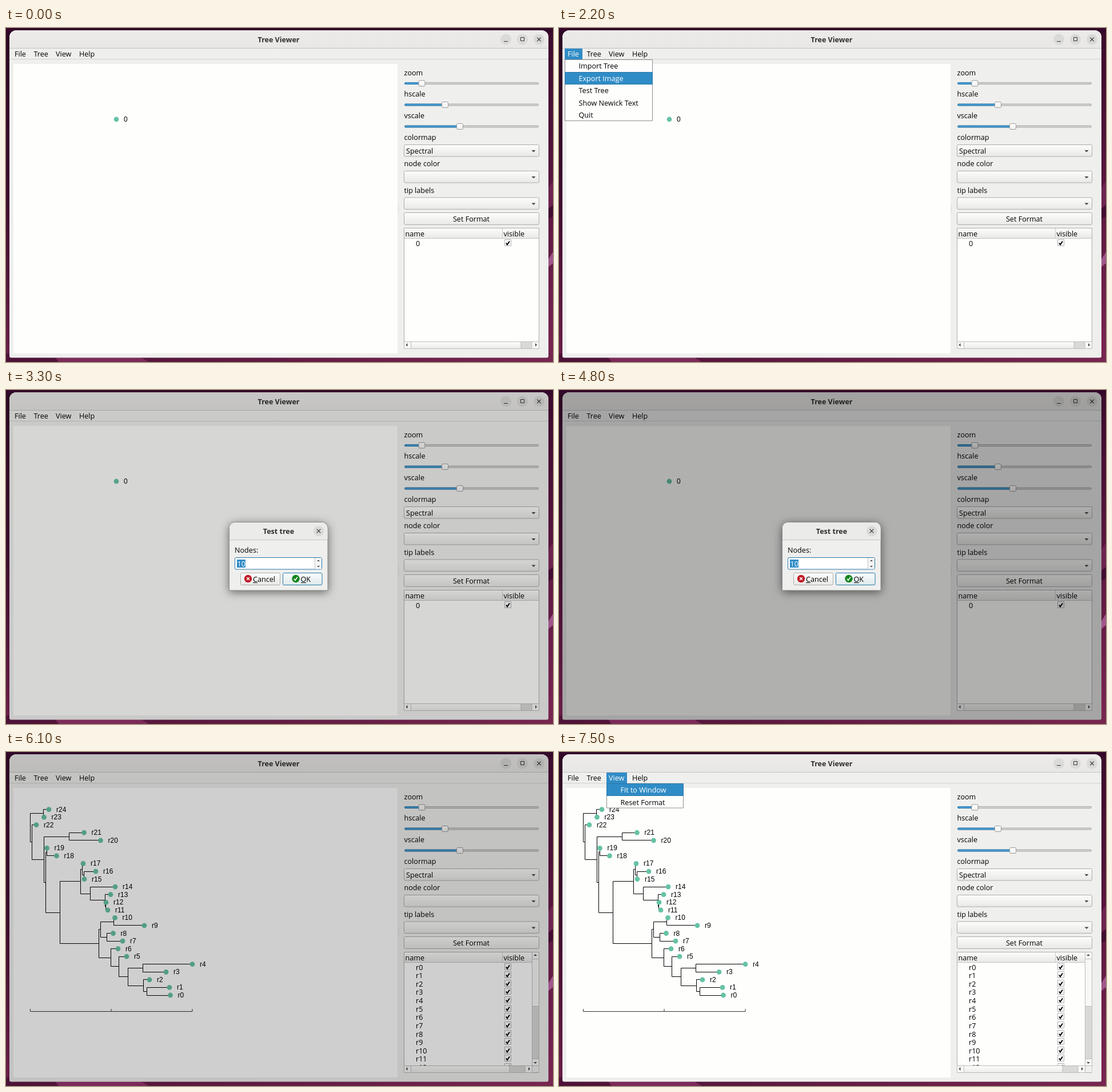
These frames come from a looping animation (957x585 px, 8 s). An HTML page with a canvas:

```html
<!DOCTYPE html>
<html lang="en">
<head>
<meta charset="utf-8">
<title>Tree Viewer</title>
<style>
html, body { margin: 0; width: 100%; height: 100%; overflow: hidden; background: #3a0b2c; }
canvas { display: block; }
</style>
</head>
<body>
<canvas id="stage" width="957" height="585"></canvas>
<script>
const c = document.getElementById('stage').getContext('2d');
const UI = '"Open Sans", sans-serif', PLOT = '"Liberation Sans", sans-serif';
const BLUE = '#308cc6', EDGE = '#acacab', PANEL = '#efefee', GREEN = '#66c2a5';
const clamp = v => Math.max(0, Math.min(1, v));

// [node x, upper child, lower child]; a bare number is the x of a tip
const TREE = [42, [65, 75, 66.5], [45, 53, [66, [110, 136.5, 165.5], [69.5, [71, 71.5, 88.5],
  [94, [130, [133, 135, [136.5, 157, 137]], [147.5, 191, [173, 183, [174.5, 175, 178]]]],
    [162, [165.5, [188, 190.5, 242], [176.5, 187.5, 204]],
      [183, 196, [197, 211, [213, [239, 326, 280], [240, 251, [246, 286, 287.5]]]]]]]]]]];

const MENUS = {
  File: { x: 15, tab: [10, 31], left: 10.5, width: 153, items: ['Import Tree', 'Export Image', 'Test Tree', 'Show Newick Text', 'Quit'] },
  Tree: { x: 48.5, tab: [45, 33], left: 44.5, width: 145, items: ['Show Unrooted', 'Subsample Tree'] },
  View: { x: 87, tab: [83, 36], left: 83.5, width: 134, items: ['Fit to Window', 'Reset Format'] },
  Help: { x: 128 }
};
// [time, open menu, highlighted item]
const STEPS = [[0], [500, 'File'], [1200, 'Tree'], [1300, 'Tree', 0], [1700, 'Tree'], [1800, 'File'],
  [2000, 'File', 0], [2200, 'File', 1], [2700, 'File', 2], [3000], [7300, 'View'], [7500, 'View', 0]];

function box(x, y, w, h, fill, stroke, r = 0) {
  c.beginPath();
  c.roundRect(x, y, w, h, r);
  if (fill) { c.fillStyle = fill; c.fill(); }
  if (stroke) { c.strokeStyle = stroke; c.stroke(); }
}
function path(pts, stroke, width = 1) {
  c.beginPath();
  pts.forEach(p => c.lineTo(...p));
  c.lineWidth = width;
  c.strokeStyle = stroke;
  c.stroke();
  c.lineWidth = 1;
}
function poly(pts, fill) {
  c.beginPath();
  pts.forEach(p => c.lineTo(...p));
  c.fillStyle = fill;
  c.fill();
}
function dot(x, y, r, fill) {
  c.beginPath();
  c.arc(x, y, r, 0, 7);
  c.fillStyle = fill;
  c.fill();
}
function text(s, x, y, { font = '12.6px ' + UI, fill = '#000', align = 'left' } = {}) {
  c.font = font;
  c.fillStyle = fill;
  c.textAlign = align;
  c.fillText(s, x, y);
}
const title = (s, y) => text(s, 477, y, { font: 'bold 12.5px ' + UI, fill: '#2e2e2e', align: 'center' });
function grad(y0, y1, ...stops) {
  const g = c.createLinearGradient(0, y0, 0, y1);
  stops.forEach((s, i) => g.addColorStop(i / (stops.length - 1), s));
  return g;
}
function cross(x, y, r, color, width) {
  path([[x - r, y - r], [x + r, y + r]], color, width);
  path([[x - r, y + r], [x + r, y - r]], color, width);
}
function arrow(x, y, dx, dy, r = 3) {
  poly([[x + dx * r, y + dy * r], [x - dy * r, y - dx * r], [x + dy * r, y + dx * r]], '#444');
}
function button(x, y, w, h, stroke = EDGE, low = '#e8e8e7') {
  box(x, y, w, h, grad(y, y + h, '#fdfdfc', low), stroke, 2);
}
function tick(x, y, color, width) {
  path([[x - 3, y], [x - 1, y + 3], [x + 3, y - 3]], color, width);
}

function desktop() {
  c.fillStyle = grad(0, 585, '#2b0722', '#3d0c2e', '#6b1f49');
  c.fillRect(0, 0, 10, 585);
  c.fillStyle = grad(0, 585, '#3a0a2c', '#5a1740', '#7a2652');
  c.fillRect(940, 0, 17, 585);
  c.fillStyle = '#33082a';
  c.fillRect(0, 0, 957, 8);
  const g = c.createLinearGradient(0, 0, 957, 0);
  g.addColorStop(0, '#4d1237');
  g.addColorStop(1, '#76264f');
  c.fillStyle = g;
  c.fillRect(0, 570, 957, 15);
  poly([[85, 575], [233, 575], [250, 585], [92, 585]], '#7a2b59');
  poly([[947, 282], [957, 268], [957, 310], [947, 318]], '#6d2450');
  poly([[947, 318], [957, 310], [957, 330], [947, 335]], '#420d32');
  poly([[947, 408], [957, 392], [957, 412], [947, 420]], '#a0568a');
}

function frame() {
  box(6, 4, 943, 573.5, PANEL, null, [12, 12, 3, 3]);
  box(6, 4, 943, 32, grad(4, 36, '#ecebea', '#e8e7e5'), null, [12, 12, 0, 0]);
  path([[6, 35.5], [949, 35.5]], '#c4c4c2');
  path([[6, 54.5], [949, 54.5]], '#d2d2d1');
  title('Tree Viewer', 25);
  [874.5, 903.5, 932.5].forEach(x => dot(x, 20, 9.5, '#dadad8'));
  path([[871, 23.5], [878, 23.5]], '#333');
  box(900.5, 16.5, 6, 6, null, '#333');
  cross(932.5, 20, 3.3, '#333', 1.2);
  for (const name in MENUS) text(name, MENUS[name].x, 50);
  box(13, 63, 672, 507, '#fefefd');
  for (let y = 310; y < 325; y += 3) box(686, y, 1, 1, '#b5b5b5');
}

function slider(label, y, x) {
  text(label, 696.5, y - 14.5);
  box(697.5, y - 1.5, 234, 3, '#d2d2d1', '#a9a9a8', 1.5);
  box(697.5, y - 1.5, x - 697, 3, '#4a9fd6', '#2a78aa', 1.5);
  box(x - 5.5, y - 5, 11, 10, grad(y - 5, y + 5, '#fff', '#f0f0ef'), '#999', 2);
}
function combo(label, y, value) {
  text(label, 696.5, y - 8.5);
  button(696.5, y, 236, 20.5);
  text(value, 700, y + 15);
  arrow(923, y + 9.5, 0, 1, 3.5);
}

function table(names, full) {
  const right = full ? 920 : 932;
  box(696.5, 350.5, 236, 211, '#fefefd', EDGE);
  box(697, 351, right - 697, 17.5, grad(351, 368, '#fcfcfb', '#e9e9e8'));
  path([[697, 368.5], [right, 368.5]], '#c3c3c2');
  path([[868.5, 351], [868.5, 368]], '#c9c9c8');
  text('name', 698.5, 364.5);
  text('visible', 870.5, 364.5);
  c.save();
  c.beginPath();
  c.rect(697, 351, right - 697, 198);
  c.clip();
  names.forEach((name, i) => {
    const y = 376.5 + i * 14.63;
    text(name, 717, y + 5);
    box(872.5, Math.round(y) - 6.5, 11, 11, '#fff', '#b0b0af');
    tick(878, Math.round(y) - .5, '#000', 2);
  });
  c.restore();
  const end = full ? 881 : 901;
  box(696.5, 549.5, right - 696, 12, '#d9d9d8', '#bcbcbb');
  box(696.5, 549.5, 12, 12, '#f8f8f7', '#bcbcbb');
  box(708.5, 549.5, end - 708.5, 12, grad(549, 561, '#fdfdfc', '#ededec'), '#bcbcbb');
  box(right - 12, 549.5, 12.5, 12, '#f8f8f7', '#bcbcbb');
  arrow(702.5, 555, -1, 0);
  arrow(right - 6, 555, 1, 0);
  if (!full) return;
  box(920.5, 350.5, 12, 199, '#d9d9d8', '#bcbcbb');
  box(920.5, 350.5, 12, 12, '#f8f8f7', '#bcbcbb');
  box(920.5, 362.5, 12, 83, '#f8f8f7', '#bcbcbb');
  box(920.5, 537.5, 12, 12, '#f8f8f7', '#bcbcbb');
  box(921, 550, 11.5, 11, PANEL);
  arrow(926, 357, 0, -1);
  arrow(926, 543, 0, 1);
}

function tip(label, x, y) {
  dot(x, y, 4.4, GREEN);
  text(label, x + 13, y + 4, { font: '12px ' + PLOT });
}

function tree() {
  let n = 25;
  const tips = [], px = v => Math.floor(v) + .5;
  // draws the branches below a node and returns its height
  const walk = node => {
    if (!Array.isArray(node)) {
      const y = 426 - --n * 13.56;
      tips.push(['r' + n, node, y]);
      return y;
    }
    const [x, ...kids] = node;
    const ys = kids.map(walk);
    const ends = kids.map(k => k[0] ?? k);
    path([[ends[0], px(ys[0])], [px(x), px(ys[0])], [px(x), px(ys[1])], [ends[1], px(ys[1])]], '#000');
    return (ys[0] + ys[1]) / 2;
  };
  // tips count down from the top, so their rows are mirrored
  walk(TREE);
  tips.forEach(t => tip(...t));
  path([[42.5, 450], [42.5, 454.5], [326, 454.5], [326, 450]], '#333');
  path([[184, 450], [184, 454]], '#333');
}

function menu(name, hot) {
  const { x, tab, left, width, items } = MENUS[name];
  box(tab[0], 36, tab[1], 19, BLUE);
  text(name, x, 50, { fill: '#fff' });
  box(left, 55.5, width, items.length * 21.5 - .5, '#fefefd', '#8f8f8e');
  items.forEach((s, i) => {
    const y = 55 + i * 21.5;
    if (i === hot) box(left, Math.round(y) + .5, width, 21, BLUE, '#2a78aa');
    text(s, left + 24, y + 16, { fill: i === hot ? '#fff' : '#000' });
  });
}

function dialog(t) {
  const p = clamp((t - 2975) / 250), s = 1 - (1 - p) ** 2;
  const focus = t < 5700;
  c.save();
  c.globalAlpha = s;
  c.translate(0, 291);
  c.scale(1, s);
  c.translate(0, -291);
  c.save();
  if (t < 6000) {
    c.shadowColor = 'rgba(0,0,0,.55)';
    c.shadowBlur = 16;
    c.shadowOffsetY = 3;
  }
  box(390.5, 231.5, 172.5, 119.5, PANEL, null, [10, 10, 0, 0]);
  c.restore();
  box(390.5, 231.5, 172.5, 119.5, PANEL, '#8b8b8a', [10, 10, 0, 0]);
  box(391, 232, 171.5, 30, '#ebebe9', null, [10, 10, 0, 0]);
  path([[391, 262.5], [563, 262.5]], '#c4c4c2');
  title('Test tree', 252);
  dot(547, 247, 9.3, '#dadad8');
  cross(547, 247, 3.3, '#333', 1.2);
  text('Nodes:', 400, 285);

  box(400.5, 293.5, 152, 20.5, '#fff', focus ? '#2a78aa' : EDGE, 2);
  box(541, 294, 11, 19.5, '#f7f7f6');
  path([[540.5, 294], [540.5, 314]], '#c0c0bf');
  arrow(546.5, 300, 0, -1, 2.5);
  arrow(546.5, 308, 0, 1, 2.5);
  const value = t < 5000 ? '10' : t < 5200 ? '2' : '25';
  const selected = t < 4200 || (t >= 4800 && t < 5000);
  if (selected) box(404, 297, 15, 14, BLUE);
  text(value, 404.5, 309, { fill: selected ? '#fff' : '#000' });
  if (focus && !selected) box(404 + value.length * 7.5, 297, 1, 14, '#000');

  button(410.5, 320.5, 69, 21);
  dot(423.5, 330.5, 6.7, '#c01c28');
  cross(423.5, 330.5, 2.3, '#fff', 1.5);
  text('Cancel', 432, 335.5);
  path([[432, 337.5], [440, 337.5]], '#000');
  button(484.5, 320.5, 68.5, 21, '#2a78aa', focus ? '#dce9ec' : '#e4f1f5');
  dot(507, 330.5, 6.7, '#12851c');
  tick(507, 330.5, '#fff', 1.5);
  text('OK', 515.5, 335.5);
  path([[516, 337.5], [525, 337.5]], '#000');
  c.restore();
}

function draw(now) {
  const t = Math.floor(now % 8000 / 100) * 100;
  const grown = t >= 6100;
  desktop();
  frame();
  slider('zoom', 97, 727.5);
  slider('hscale', 134.5, 768);
  slider('vscale', 172.5, 794);
  combo('colormap', 204.5, 'Spectral');
  combo('node color', 250.5, '');
  combo('tip labels', 297, '');
  button(696.5, 323.5, 236, 21);
  text('Set Format', 814, 339, { align: 'center' });
  table(grown ? Array.from({ length: 13 }, (_, i) => 'r' + i) : ['0'], grown);
  if (grown) tree(); else tip('0', 193, 160);

  const [, name, hot] = STEPS.findLast(s => t >= s[0]);
  if (name) menu(name, hot);
  const dim = .31 * clamp(Math.min((t - 3050) / 500, 1 - (t - 6000) / 250));
  box(6, 4, 943, 573.5, `rgba(0,0,0,${dim})`, null, [12, 12, 3, 3]);
  if (t >= 3000 && t <= 6000) dialog(t);
  requestAnimationFrame(draw);
}
requestAnimationFrame(draw);
</script>
</body>
</html>
```
